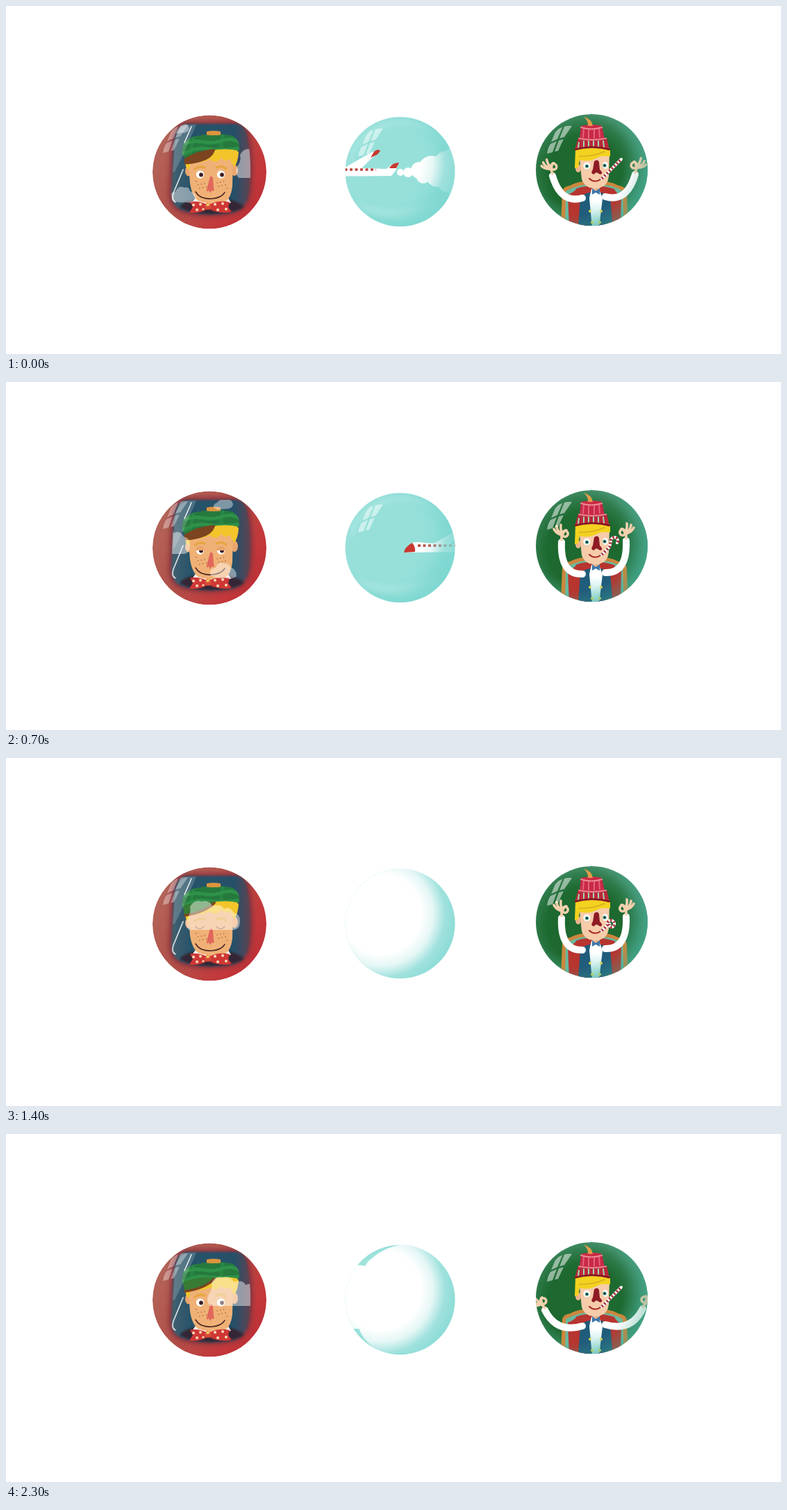
An HTML page that plays this animation: 1116 px wide and 502 px high, repeating every 2.4 s.

```html
<!DOCTYPE html>
<html lang="en">
<head>
<meta charset="utf-8">
<title>Three bubbles</title>
<style>
html, body { margin: 0; width: 100%; height: 100%; overflow: hidden; background: #fff; }
svg { display: block; }
.hidden { display: none; }
.line { fill: none; stroke-linecap: round; stroke-linejoin: round; }
</style>
</head>
<body>
<svg width="1116" height="502" viewBox="0 0 1116 502">
<defs>
  <linearGradient id="redGlass" x1="0" y1=".15" x2="1" y2=".8">
    <stop offset="0" stop-color="#b4695d"/><stop offset=".45" stop-color="#b1504a"/>
    <stop offset=".8" stop-color="#c4373a"/><stop offset="1" stop-color="#b92f36"/>
  </linearGradient>
  <linearGradient id="windowFill">
    <stop offset="0" stop-color="#41606f"/><stop offset=".25" stop-color="#28536a"/>
    <stop offset=".8" stop-color="#275069"/><stop offset="1" stop-color="#5f4250"/>
  </linearGradient>
  <radialGradient id="skyRim" gradientUnits="userSpaceOnUse" cx="540" cy="225" r="107">
    <stop offset=".54" stop-color="#7bd6d0" stop-opacity="0"/>
    <stop offset=".7" stop-color="#7bd6d0" stop-opacity=".2"/>
    <stop offset=".86" stop-color="#7bd6d0" stop-opacity=".72"/>
    <stop offset="1" stop-color="#7bd6d0" stop-opacity=".85"/>
  </radialGradient>
  <radialGradient id="greenGlass" gradientUnits="userSpaceOnUse" cx="833" cy="242" r="98">
    <stop offset=".55" stop-color="#1d6930"/><stop offset=".75" stop-color="#2f7b4b"/>
    <stop offset="1" stop-color="#559f80"/>
  </radialGradient>
  <radialGradient id="greenRim" gradientUnits="userSpaceOnUse" cx="822" cy="222" r="112">
    <stop offset=".6" stop-color="#3fa68c" stop-opacity="0"/>
    <stop offset="1" stop-color="#3fa68c" stop-opacity=".65"/>
  </radialGradient>
  <radialGradient id="greenEdge" gradientUnits="userSpaceOnUse" cx="822" cy="222" r="112">
    <stop offset=".7" stop-color="#3fa68c" stop-opacity="0"/>
    <stop offset="1" stop-color="#3fa68c" stop-opacity=".5"/>
  </radialGradient>
  <linearGradient id="shirt" x2="0" y2="1">
    <stop offset=".3" stop-color="#fff"/><stop offset="1" stop-color="#8ed8d4"/>
  </linearGradient>
  <filter id="soft" x="-20%" y="-20%" width="140%" height="140%"><feGaussianBlur stdDeviation="3"/></filter>
  <filter id="softer" x="-20%" y="-20%" width="140%" height="140%"><feGaussianBlur stdDeviation="1.600"/></filter>
  <clipPath id="redClip"><circle cx="293" cy="239.500" r="82"/></clipPath>
  <clipPath id="skyClip"><circle cx="567.500" cy="239" r="79"/></clipPath>
  <clipPath id="greenClip"><circle cx="843.500" cy="236.500" r="80.500"/></clipPath>
  <path id="windowShape" d="M262 170H330Q345 170 348 190Q355 230 350 270Q346 294 322 298Q285 304 252 294Q238 288 238 270L241 200Q244 170 262 170Z"/>
  <clipPath id="windowClip"><use href="#windowShape"/></clipPath>
  <path id="hatShape" d="M254 214Q251 194 272 188Q300 182 326 187Q339 195 335 209Q322 205 304 207Q278 213 258 220Z"/>
  <clipPath id="hatClip"><use href="#hatShape"/></clipPath>
  <g id="glint" fill="#fff" opacity=".5">
    <path d="M12 3Q17-3 22-4L15 13L6 17Z"/><path d="M25-5Q31-7 36-6L25 10L18 12Z"/>
    <path d="M5 20L14 16L8 32L0 34Q1 26 5 20Z"/><path d="M17 15L24 13L16 30L11 31Z"/>
  </g>
  <g id="hand" fill="none" stroke="#f3d0ae" stroke-width="3.600" stroke-linecap="round">
    <path d="M0 0L0-9M-2-8Q-9-11-11-16M-1-9Q-7-14-7-20M1-9Q-2-15-1-22M2-9Q4-15 7-14"/>
    <circle cx="5" cy="-9" r="4.200"/>
  </g>
</defs>

<g clip-path="url(#redClip)">
  <circle cx="293" cy="239.500" r="82" fill="url(#redGlass)"/>
  <use href="#windowShape" fill="#7e3039" stroke="#8c353c" stroke-width="8" filter="url(#soft)"/>
  <use href="#windowShape" fill="url(#windowFill)" filter="url(#softer)"/>
  <path d="M250 290Q256 281 278 278H318Q336 282 343 290Q330 299 294 300Q263 299 250 290Z" fill="#352636" filter="url(#softer)"/>
  <path d="M276 272L268 284L291 287L324 284L317 272Z" fill="#f4ecea"/>
  <ellipse cx="263" cy="238" rx="5" ry="7.500" fill="#eaa56d"/>
  <ellipse cx="329" cy="237" rx="5" ry="8" fill="#eaa56d"/>
  <path d="M262 216H327L326 260Q324 277 316 282Q296 288 277 281Q268 275 265 256Z" fill="#f0b176"/>
  <path d="M259 225Q276 218 297 215L301 207Q326 199 335 211Q334 225 329 232Q325 229 323 220Q317 227 310 219Q302 229 294 221Q283 227 266 225L264 236Q257 234 259 225Z" fill="#f3c52b"/>
  <g id="eyes">
    <g fill="#fff"><circle cx="279.500" cy="243" r="5.700"/><circle cx="309.500" cy="243" r="5.700"/></g>
    <g fill="#3c1d25"><circle cx="281" cy="243.500" r="2.900"/><circle cx="311" cy="243.500" r="2.900"/></g>
  </g>
  <g id="halfLids" fill="#e8a56c"><path d="M273 243a6.500 6.500 0 0 1 13 0ZM303 243a6.500 6.500 0 0 1 13 0Z"/></g>
  <path id="closedLids" class="line" d="M273 243q6 7 12 0M303 243q6 7 12 0" stroke="#a96b48" stroke-width="1.500"/>
  <path class="line" d="M272 235Q278 230 286 233M303 233Q311 229 317 235" stroke="#e5a742" stroke-width="3"/>
  <path d="M294 246Q297 244 298 249L299 262Q301 269 296 266L294 270L292 266Q287 270 290 261Z" fill="#e1675b"/>
  <path class="line" d="M273 268Q279 279 296 278Q310 277 315 269" stroke="#4b2724" stroke-width="1.600"/>
  <g id="freckles" fill="#9b5c3e"></g>
  <use href="#hatShape" fill="#25793d"/>
  <g clip-path="url(#hatClip)" class="line" stroke="#2f9149" stroke-width="5">
    <path d="M250 201Q268 193 283 196T312 194T340 199M254 214Q274 203 290 206T340 205"/>
    <path d="M270 184L265 220M312 184L309 210" opacity=".5"/>
  </g>
  <path d="M289 181Q299 179 309 181L309 186Q298 187 289 186Z" fill="#dd953f"/>
  <path id="brimUp" d="M257 220Q276 208 301 206Q300 216 288 222Q270 229 257 228Z" fill="#7c441f"/>
  <g id="brimDown">
    <path d="M255 213Q280 205 302 207Q295 218 257 227Z" fill="#377b35"/>
    <path class="line" d="M258 227Q286 223 300 209" stroke="#7c441f" stroke-width="3.500"/>
  </g>
  <g fill="#cf3735">
    <path d="M291 287Q276 280 265 283L269 290L264 298Q280 300 291 292Z"/>
    <path d="M291 287Q307 279 322 283L320 290L325 297Q307 301 291 292Z"/>
  </g>
  <g id="tieDots" fill="#f6ddb9"></g>
  <circle cx="291" cy="289" r="5" fill="#d94939"/>
  <path d="M288 285L293 284L293 288L289 289Z" fill="#edc55b"/>
  <g clip-path="url(#windowClip)" fill="#fff">
    <path id="topCloud" opacity=".4" d="M0 181Q-1 176 5 174Q9 168 17 170Q27 168 28 177Q27 182 20 183L5 184Z"/>
    <path id="midCloud" opacity=".45" d="M2 248Q-5 239 1 230Q6 223 4 215Q9 204 21 207Q31 204 36 213Q51 210 53 218Q61 213 67 223Q76 225 76 234Q77 246 68 248Z"/>
    <path id="lowCloud" opacity=".43" d="M0 279Q-3 269 7 268Q11 258 20 262Q26 260 28 267Q38 270 37 281Q29 285 22 283Q10 285 0 279Z"/>
  </g>
  <path d="M244 190Q250 173 264 171L274 171L256 213L243 239L240 240Z" fill="#fff" opacity=".18"/>
  <path class="line" d="M267 174L257 197M255 236L241 270Q238 280 244 283" stroke="#fff" stroke-width="1.600" opacity=".85"/>
  <use href="#glint" x="226" y="178" opacity=".7"/>
</g>

<g clip-path="url(#skyClip)">
  <rect x="487" y="158" width="162" height="162" fill="#97e0da"/>
  <path d="M502 280Q548 307 628 278Q606 315 560 308Q520 303 502 280Z" fill="#c4efeb" opacity=".45" filter="url(#soft)"/>
  <path class="line" d="M497 222Q506 177 565 168Q605 166 626 194" stroke="#c4efeb" stroke-width="5" opacity=".45" filter="url(#soft)"/>
  <g id="cloudTrail" fill="#fff"></g>
  <g id="plane">
    <path d="M12 232Q20 230 30 232L75 234L103 235L110 229L119 230L117 236L110 245L0 246Z" fill="#fff"/>
    <path d="M0 246Q1 238 12 232Q17 238 16 245Z" fill="#c8392f"/>
    <path d="M43 233L83 210L91 212L80 221L66 235Z" fill="#fff"/>
    <path d="M80 219L85 210Q91 205 94 209L90 214Z" fill="#c8392f"/>
    <path d="M107 234Q111 226 121 226L117 234Z" fill="#c8392f"/>
    <path d="M20 236H88" stroke="#bd4840" stroke-width="3.600" stroke-dasharray="4 3.500"/>
  </g>
  <g id="puffedSky" fill="#fff">
    <circle cx="580" cy="238" r="79"/><circle cx="505" cy="235" r="46"/><circle cx="560" cy="262" r="55"/>
  </g>
  <rect id="whiteSky" x="487" y="158" width="162" height="162" fill="#fff"/>
  <rect x="487" y="158" width="162" height="162" fill="url(#skyRim)"/>
  <use href="#glint" x="507" y="183"/>
</g>

<g clip-path="url(#greenClip)">
  <rect x="762" y="155" width="164" height="164" fill="url(#greenGlass)"/>
  <rect x="762" y="155" width="164" height="164" fill="url(#greenRim)"/>
  <path d="M799 320L801 267Q803 260 812 259Q824 252 847 252Q870 252 882 259Q894 261 894 270L896 320Z" fill="#cd873d"/>
  <path d="M805 320L806 267Q826 256 848 257Q873 257 888 267L890 320Z" fill="#68b89f"/>
  <path d="M811 320L809 272Q818 269 822 263Q849 255 876 264Q879 271 886 273L885 320Z" fill="#b7342f"/>
  <path d="M827 275Q848 261 870 275L874 320H824Z" fill="#205c7b"/>
  <path d="M843 264L854 264L859 278L854 320H844L840 277Z" fill="url(#shirt)"/>
  <path d="M844 256H855V264L849 268L844 264Z" fill="#eab58d"/>
  <path d="M849 267L844 263L844 272L849 269L855 272V263Z" fill="#3976aa"/>
  <g fill="#d6d951"><circle cx="841" cy="296" r="2"/><circle cx="857" cy="296" r="2"/><circle cx="844" cy="312" r="2"/><circle cx="855" cy="312" r="2"/></g>
  <g id="arms">
    <g id="leftArm"><path class="line" stroke="#fff" stroke-width="10"/><use href="#hand"/></g>
    <use href="#leftArm" transform="translate(1693 -2) scale(-1 1)"/>
  </g>
  <ellipse cx="824" cy="234" rx="4" ry="6" fill="#eab58d"/>
  <path d="M825 211H869L868 246Q866 262 850 263Q834 264 829 250Z" fill="#f6ccaa"/>
  <path d="M819 234L820 206Q846 202 870 206L870 217Q856 215 847 221Q836 225 826 222L824 233Z" fill="#f3d220"/>
  <path class="line" d="M826 217Q846 217 862 210" stroke="#d8ae20" stroke-width="1.500"/>
  <g fill="#fff"><ellipse cx="836.500" cy="230.500" rx="5" ry="5"/><ellipse cx="863" cy="230" rx="4" ry="5"/></g>
  <g fill="#368c79"><circle cx="836.500" cy="231" r="2.600"/><circle cx="862" cy="230" r="2.600"/></g>
  <g fill="#17242c"><circle cx="836.500" cy="231" r="1.200"/><circle cx="862" cy="230" r="1.200"/></g>
  <path d="M847 224Q852 220 854 225L855 236Q861 241 856 243L850 240L846 243Q841 241 845 236Z" fill="#8e1b24"/>
  <path class="line" d="M840 249Q848 257 859 248" stroke="#a9282d" stroke-width="2"/>
  <path d="M824 190H865L869 208Q844 202 819 208Z" fill="#b92837"/>
  <path d="M828 173Q844 169 858 173L862 191Q844 194 826 191Z" fill="#c92a45"/>
  <path d="M832 177L831 190M839 178V191M847 178V191M854 177L855 190" stroke="#e2657d" stroke-width="2"/>
  <path d="M828 175Q843 180 858 175M825 191Q844 195 864 191" class="line" stroke="#ec8795" stroke-width="2"/>
  <path d="M825 197L824 204M832 195V203M839 195V202M846 195V202M853 195V202M860 195L861 203" class="line" stroke="#a4d6b8" stroke-width="2"/>
  <path d="M820 207Q844 200 869 207" class="line" stroke="#821a23" stroke-width="2.500"/>
  <path d="M838 173Q839 166 832 160Q844 163 845 173Z" fill="#e39c4a"/>
  <path id="blowerBase" class="line" stroke="#fff" stroke-width="4"/>
  <path id="blowerStripes" fill="none" stroke="#a72934" stroke-width="4" stroke-dasharray="2.300 2.700"/>
  <rect x="762" y="155" width="164" height="164" fill="url(#greenEdge)"/>
  <use href="#glint" x="779" y="179"/>
</g>
</svg>
<script>
const LOOP = 2400, STEP = 100;
const $ = id => document.getElementById(id);
const show = (id, on) => $(id).classList.toggle('hidden', !on);
const shift = (id, x) => $(id).setAttribute('transform', `translate(${x} 0)`);
const circles = (id, list) => {
  $(id).innerHTML = list.map(([x, y, r]) => `<circle cx="${x}" cy="${y}" r="${r}"/>`).join('');
};

circles('freckles', [...Array(14).keys()].map(i =>
  [(i < 7 ? 274 : 304) + i % 7 * 2.4, 253 + i * 5 % 11, .8]));
circles('tieDots', [[270, 287, 2], [280, 286, 2], [275, 294, 2], [284, 293, 1.6],
  [301, 286, 2], [312, 285, 2], [305, 294, 2], [317, 293, 2]]);
circles('cloudTrail', [[5, 240, 5], [16, 240, 7], [32, 237, 12], [38, 246, 10], [50, 235, 19],
  [58, 245, 16], [73, 231, 22], [76, 248, 21], [104, 238, 44], [150, 238, 74]]);

// Arm shapes: lift, wrist x and y, elbow x and y, hand angle
const ARM_POSES = [
  [0, 788, 303, 822, 302, -100], [.45, 776, 254, 793, 288, -42],
  [.7, 787, 245, 799, 286, -20], [1, 800, 231, 798, 278, 0]
];
const ARM_LIFT = [.7, .9, 1, .85, .7, .9, 1, 1, .6, .15, 0, .45];
const BLOWER_REACH = [1, .4, .3, .4, 1, 1, 1, .4, .3, .3, .4, 1];
const PLANE_NOSE = [445, 416, 375, 330, 300, 637, 573, 509];
const TRAIL_TIP = [563, 534, 478];

function drawDriver(t) {
  const phase = t % 1050;
  shift('midCloud', 333 - phase * .206);
  shift('lowCloud', 237 + (1050 - phase) % 1050 * .165);
  shift('topCloud', 236 + (1050 - phase) % 1050 * .18);
  const brimDown = phase >= 150 && phase <= 450;
  show('brimDown', brimDown);
  show('brimUp', !brimDown);
  const closed = t === 600 || t === 1400;
  show('eyes', !closed);
  show('closedLids', closed);
  show('halfLids', [500, 700, 1300, 1500].includes(t));
}

function drawSky(t) {
  const pose = Math.floor((t + 90) / 120) % 8;
  shift('plane', PLANE_NOSE[pose]);
  shift('cloudTrail', TRAIL_TIP[pose] ?? 700);
  show('puffedSky', pose === 3);
  show('whiteSky', pose === 4);
}

function drawParty(t) {
  const beat = t / STEP % 12;
  const lift = ARM_LIFT[beat];
  const next = Math.max(1, ARM_POSES.findIndex(pose => pose[0] >= lift));
  const from = ARM_POSES[next - 1], to = ARM_POSES[next];
  const mix = (lift - from[0]) / (to[0] - from[0]);
  const [, x, y, elbowX, elbowY, angle] = from.map((value, i) => value + (to[i] - value) * mix);
  const [sleeve, hand] = $('leftArm').children;
  sleeve.setAttribute('d', `M830 277Q${elbowX} ${elbowY} ${x} ${y}`);
  hand.setAttribute('transform', `translate(${x} ${y - 3}) rotate(${angle})`);

  const reach = BLOWER_REACH[beat];
  const curl = reach === 1 ? '' : reach > .35 ? 'L871 229a5 5 0 1 1 9 3' : 'a5 5 0 1 1 7 3a3 3 0 0 1 -4 -4';
  const blower = `M858 249L${858 + 28 * reach} ${249 - 28 * reach}${curl}`;
  $('blowerBase').setAttribute('d', blower);
  $('blowerStripes').setAttribute('d', blower);
}

function draw() {
  const t = Math.floor(performance.now() % LOOP / STEP) * STEP;
  drawDriver(t);
  drawSky(t);
  drawParty(t);
  requestAnimationFrame(draw);
}
draw();
</script>
</body>
</html>
```
